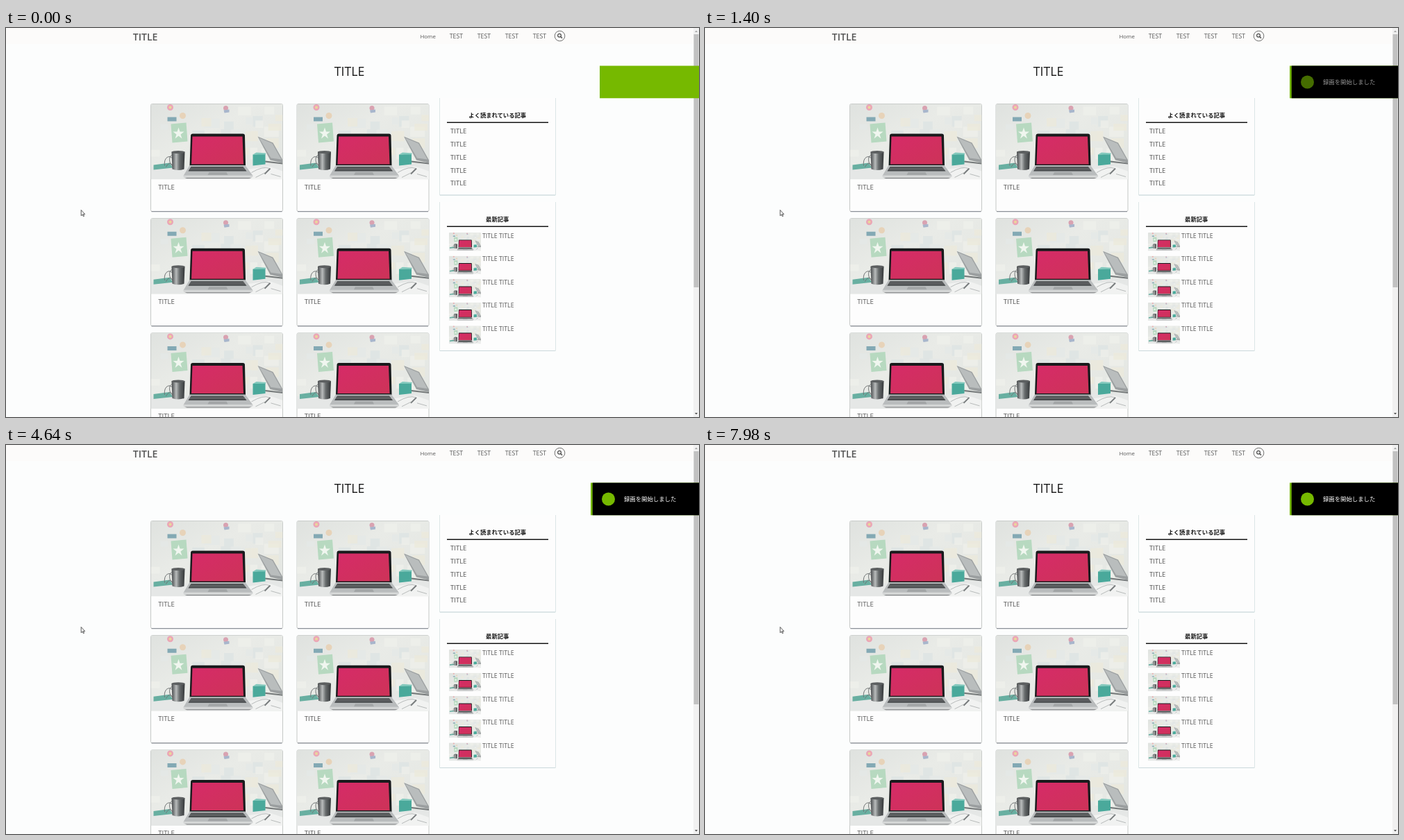
Recreate the animation shown at these times as an HTML page. Size 998 by 561 pixels, loop 8000 ms.

```html
<!DOCTYPE html>
<html lang="ja">
<head>
<meta charset="utf-8">
<style>
  html, body { margin: 0; width: 100%; height: 100%; overflow: hidden; background: #fcfdfd; }
  svg { display: block; width: 100vw; height: 100vh; }
  text { font-family: "Open Sans", "Noto Sans CJK JP", "Noto Sans CJK", sans-serif; fill: #555; }
  .heading { font-family: "Noto Sans CJK JP", "Noto Sans CJK", sans-serif; font-weight: 700; fill: #151515; text-anchor: middle; }
</style>
</head>
<body>
<svg viewBox="0 0 998 561">
  <defs>
    <linearGradient id="wall" x2="1" y2="1">
      <stop offset="0" stop-color="#dfe2df"/>
      <stop offset=".4" stop-color="#e9ebe7"/>
      <stop offset="1" stop-color="#e2e5e1"/>
    </linearGradient>
    <linearGradient id="metal">
      <stop offset="0" stop-color="#45484a"/>
      <stop offset=".35" stop-color="#b9bcbc"/>
      <stop offset=".6" stop-color="#686c6d"/>
      <stop offset="1" stop-color="#35383a"/>
    </linearGradient>
    <linearGradient id="screen" x2="1" y2="1">
      <stop offset="0" stop-color="#d62b68"/>
      <stop offset="1" stop-color="#cd3358"/>
    </linearGradient>
    <clipPath id="frame"><path d="M0 109V2q0-2 2-2H188q2 0 2 2V109z"/></clipPath>

    <g id="photo" clip-path="url(#frame)">
      <path fill="url(#wall)" d="M0 0H190V109H0z"/>
      <g id="papers"></g>
      <circle cx="28" cy="5" r="4.5" fill="#eba6b6"/>
      <circle cx="28" cy="5" r="2" fill="#ead69b"/>
      <circle cx="46" cy="17" r="4.5" fill="#e7d3b9"/>
      <path fill="#83a9b4" d="M24 19h13v6H24z"/>
      <circle cx="108" cy="6" r="3.5" fill="#d9a2b1"/>
      <path fill="#a8b6cc" d="M105 9l8-1v4l-7 1z"/>
      <path fill="#b7d9c0" d="M29 29l22-2 2 27-22 2z"/>
      <path fill="#f0f6ef" d="M40 34l2 6 6 0-5 4 2 6-5-4-5 4 2-6-5-4 6 0z"/>
      <path fill="#e5e7e6" d="M0 91l190-5V109H0z"/>
      <path fill="#f1f2f1" d="M128 96l42-6 20 7v12h-48z"/>
      <path fill="#68afa1" d="M4 88l23-3 5 7-28 3z"/>
      <path fill="none" stroke="#707475" d="M20 89c-2-14 10-17 13-7M22 91c4-8 9-6 10 1M31 74c-6 0-5 15 2 15"/>
      <path fill="url(#metal)" d="M30 69h19l-1 25q-8 3-17 0z"/>
      <ellipse cx="39.500" cy="69.500" rx="9.500" ry="2" fill="#5c5f60"/>
      <path fill="#9b9fa0" d="M154 47l22 9 14 25v4l-18-4z"/>
      <path fill="#b9bdbd" d="M156 49l19 8 13 23-15-2z"/>
      <path fill="#75797a" d="M165 82l25 3v2l-26-3z"/>
      <path fill="#4aa99b" d="M147 73l18-1v15l-18 2z"/>
      <path fill="#83c9bd" d="M147 73l5-3 14 1-1 2z"/>
      <path stroke="#777b7c" stroke-width="2" d="M164 101l8-8"/>
      <path stroke="#a8abab" stroke-width=".8" fill="none" d="M145 99q17-10 26-6M151 106l14-7M173 101l14 4"/>
      <path fill="#191a1c" d="M56 89l1.500-43q0-3 3-3h72q3 0 3 3l1 43z"/>
      <path fill="url(#screen)" d="M60 47h72l1.500 40H58.500z"/>
      <path fill="#b9bcbd" d="M56 88.500h80l11 15H47z"/>
      <path fill="#45484a" d="M58 90.500h75l5 6.500H54z"/>
      <path fill="none" stroke="#8d9091" stroke-width=".6" d="M57 92.500h78M56 94.500h80"/>
      <path fill="#a3a6a7" d="M84 98.500h25l2 4H82z"/>
      <path fill="#d4d6d6" d="M47 103h100v2q-2 2-5 2H52q-4 0-5-2z"/>
      <path fill="#77797b" d="M49 106.500h96l-3 1H52z"/>
    </g>
  </defs>

  <path fill="#fcfdfd" d="M0 0H998V561H0z"/>
  <path fill="#fcfbfa" d="M0 0H990V23H0z"/>
  <g id="page"></g>

  <g fill="none" stroke="#4b4b4b">
    <circle cx="797.500" cy="11.500" r="7.300" stroke-width=".8"/>
    <circle cx="797" cy="10.700" r="2.400" stroke-width="1.200"/>
    <path stroke-width="1.400" d="M798.800 12.500l2.200 2.200"/>
  </g>

  <path fill="#f1f1f1" d="M990 0h8v561h-8z"/>
  <path fill="#c1c1c1" d="M990.500 9h7v365h-7z"/>
  <path fill="#a3a3a3" d="M992 6l2-2.500 2 2.500z"/>
  <path fill="#505050" d="M992 555l2 2.500 2-2.500z"/>

  <path fill="#fff" stroke="#333" stroke-width=".8" d="M108.200 262.500v8.200l1.900-1.700 1.300 2.800 1.200-.6-1.300-2.700h2.400z"/>

  <path id="greenPanel" fill="#76b900" d="M0 54.500h160v46.700H0z"/>
  <path id="blackPanel" fill="#000" d="M0 54.500h160v46.700H0z"/>
  <g id="message">
    <circle cx="867.500" cy="78" r="9.500" fill="#76b900"/>
    <text x="890" y="80.500" font-size="8.400" style="fill:#fff">録画を開始しました</text>
  </g>
</svg>

<script>
const byId = id => document.getElementById(id);
const label = (x, y, size, text, attrs = '') =>
  `<text x="${x}" y="${y}" font-size="${size}" ${attrs}>${text}</text>`;
const repeat = (count, draw) => Array.from({ length: count }, (_, i) => draw(i)).join('');

// Faint notes pinned on the wall of the photo
let seed = 7;
const random = () => (seed = seed * 16807 % 2147483647) / 2147483647;
const noteColors = ['#eff0eb', '#e4e9e7', '#eceadb', '#dde3e3'];
byId('papers').innerHTML = repeat(26, i =>
  `<rect x="${random() * 180}" y="${random() * 72}" width="${9 + random() * 14}" height="${7 + random() * 12}"
    fill="${noteColors[i % 4]}" opacity=".75"/>`);

function card(i) {
  const x = 208.5 + i % 2 * 210.5, y = 109.5 + Math.floor(i / 2) * 165.2;
  return `<g transform="translate(${x} ${y})">
    <rect width="190" height="155" rx="2" fill="#fdfdfd" stroke="#bfc2c0" stroke-width=".9"/>
    <path d="M1 155.200H189" stroke="#8b9097" stroke-width="1.200"/>
    <use href="#photo"/>${label(10.7, 123, 9.6, 'TITLE')}</g>`;
}

function sidebar(top, bottom, title) {
  return `<path d="M624.500 ${top}V${bottom}H791.500V${top}" fill="#fdfdfd" stroke="#dce6e7"/>
    <path d="M625 ${bottom}H791" stroke="#cbd9dc"/>
    ${label(707.7, top + 28, 8.3, title, 'class="heading"')}
    <path d="M635 ${top + 35.3}H781" stroke="#151515" stroke-width="1.600"/>`;
}

const recentItem = i => `<use href="#photo" transform="translate(638 ${295 + i * 33.55}) scale(.242)"/>` +
  label(686, 302.6 + i * 33.55, 8.8, 'TITLE TITLE');

byId('page').innerHTML =
  label(182.7, 17.6, 14.1, 'TITLE', 'font-weight="600"') +
  label(596.5, 15.2, 7.9, 'Home') +
  repeat(4, i => label(638.8 + i * 40, 15.2, 8.7, 'TEST')) +
  label(494.6, 69, 17.7, 'TITLE', 'text-anchor="middle" style="fill:#161616"') +
  repeat(6, card) +
  sidebar(101, 241, 'よく読まれている記事') +
  repeat(5, i => label(640, 152.4 + i * 18.7, 9.5, 'TITLE')) +
  sidebar(251, 465.5, '最新記事') +
  repeat(5, recentItem);

const progress = (t, start, end) => Math.min(1, Math.max(0, (t - start) / (end - start)));
const remaining = (t, start, end) => (1 - progress(t, start, end)) ** 3;
const moveTo = (id, x) => byId(id).setAttribute('transform', `translate(${x} 0)`);

function render(now) {
  const t = now % 8000;
  moveTo('greenPanel', 842 + 13 * remaining(t, 0, 220));
  moveTo('blackPanel', 844.7 + 153.3 * remaining(t, 420, 980));
  byId('message').setAttribute('opacity', progress(t, 1200, 1540));
}

let start;
function tick(now) {
  start ??= now;
  render(now - start);
  requestAnimationFrame(tick);
}
render(0);
requestAnimationFrame(tick);
</script>
</body>
</html>
```
